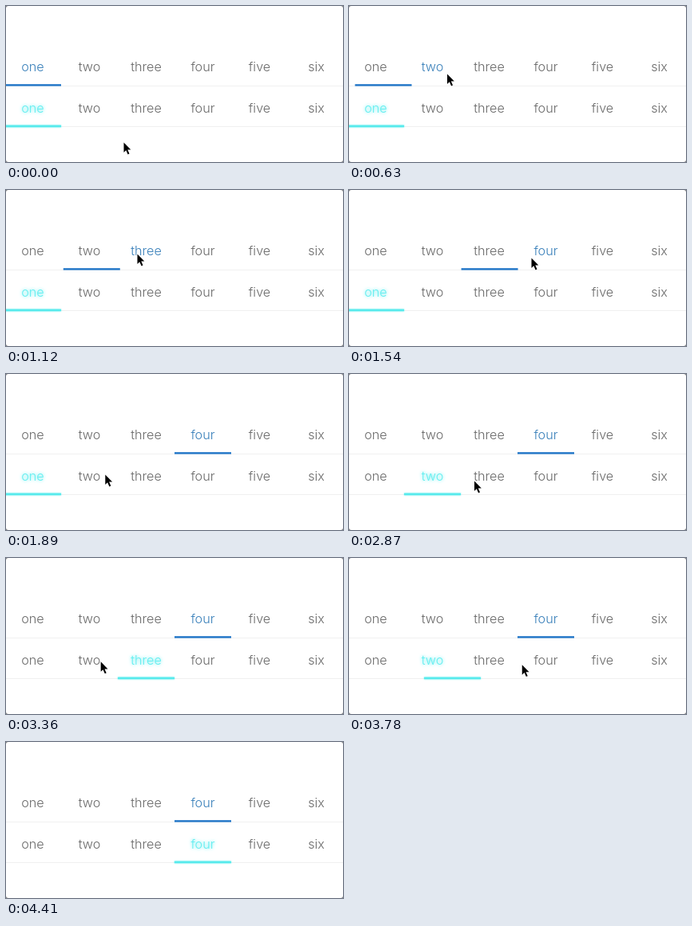
An HTML page with a canvas that plays this animation: 422x196 px, repeating every 4.55 s.

```html
<!DOCTYPE html>
<html lang="en">
<head>
<meta charset="utf-8">
<title>Tab bars</title>
<style>
  html, body { margin: 0; width: 100%; height: 100%; overflow: hidden; background: #fff; }
  canvas { display: block; }
</style>
</head>
<body>
<canvas id="stage" width="422" height="196"></canvas>
<script>
const ctx = document.getElementById('stage').getContext('2d');
const LOOP = 4550, TICK = 70, SLIDE = 300, LAG = 35, HOLD = 70;
const TAB = 71, LEFT = -2;
const labels = ['one', 'two', 'three', 'four', 'five', 'six'];
const rows = [
  { base: 82, line: 100, bar: 98.2, text: '#3a80ba', color: '#2076c8', glow: 0 },
  { base: 133.8, line: 151, bar: 149.8, text: '#62eef0', color: '#56eaec', glow: 4 }
];

// The pointer glides to (x, y) between go and stop, then releases a click on a tab
const home = { x: 147, y: 171 };
const moves = [
  { go: 70, stop: 490, x: 122.5, y: 85, row: 0, tab: 1, click: 558 },
  { go: 630, stop: 980, x: 164, y: 80, row: 0, tab: 2, click: 1068 },
  { go: 1120, stop: 1470, x: 228, y: 85, row: 0, tab: 3, click: 1500 },
  { go: 1580, stop: 2100, x: 103.5, y: 134, row: 1, tab: 1, click: 2519, hold: 2 * HOLD },
  { go: 2520, stop: 2940, x: 158, y: 134, row: 1, tab: 2, click: 3012 },
  { go: 3090, stop: 3550, x: 110, y: 129, row: 1, tab: 1, click: 3632 },
  { go: 3640, stop: 3900, x: 245, y: 135, row: 1, tab: 3, click: 4085 },
  { go: 4090, stop: 4390, x: 258, y: 200 }
];

const clamp = k => Math.min(1, Math.max(0, k));
const easeOut = k => 1 - (1 - clamp(k)) ** 2;

// CSS "ease": cubic-bezier(.25, .1, .25, 1), its parameter found by bisection
function ease(k) {
  const curve = (s, a, b) => 3 * a * s * (1 - s) ** 2 + 3 * b * s * s * (1 - s) + s ** 3;
  let s = .5;
  for (let step = .25; step > 1e-5; step /= 2) {
    s += curve(s, .25, .25) < clamp(k) ? step : -step;
  }
  return curve(s, .1, 1);
}

function drawRow({ base, line, bar, text, color, glow }, row, t) {
  let active = 0, pos = 0;
  for (const { tab, click } of moves.filter(m => m.row === row)) {
    if (t >= click) active = tab;
    pos += (tab - pos) * ease((t - click - LAG) / SLIDE);
  }
  ctx.fillStyle = '#f0f0f0';
  ctx.fillRect(0, line, 422, 1);

  ctx.shadowColor = color;
  labels.forEach((label, i) => {
    const on = i === active;
    ctx.fillStyle = on ? text : '#6a6a6a';
    ctx.shadowBlur = on ? glow : 0;
    ctx.fillText(label, LEFT + TAB * (i + .5), base);
  });
  ctx.shadowBlur = glow / 2;
  ctx.fillStyle = color;
  ctx.fillRect(LEFT + TAB * pos, bar, TAB, 2.4);
  ctx.shadowBlur = 0;
}

function drawPointer(t) {
  let { x, y } = home;
  for (const m of moves) {
    const k = easeOut((t - m.go) / (m.stop - m.go));
    x += (m.x - x) * k;
    y += (m.y - y) * k;
  }
  ctx.save();
  ctx.translate(x, y);
  if (moves.some(({ click, hold = HOLD }) => t >= click - hold && t < click)) {
    ctx.beginPath();
    ctx.arc(0, 0, 21.5, 0, 7);
    ctx.strokeStyle = '#111';
    ctx.lineWidth = 1.7;
    ctx.stroke();
  }
  const arrow = new Path2D('M.5 .5V13L3.3 10.3 5.6 15.4 7.5 14.6 5.3 9.6H9.3Z');
  ctx.lineJoin = 'round';
  ctx.strokeStyle = '#fff';
  ctx.lineWidth = 1.8;
  ctx.stroke(arrow);
  ctx.fillStyle = '#000';
  ctx.fill(arrow);
  ctx.restore();
}

function draw(t) {
  ctx.fillStyle = '#777';
  ctx.fillRect(0, 0, 422, 196);
  ctx.fillStyle = '#fff';
  ctx.beginPath();
  ctx.roundRect(0, 0, 422, 196, 3);
  ctx.fill();
  ctx.font = '300 16.2px Inter, Roboto, sans-serif';
  ctx.textAlign = 'center';
  rows.forEach((row, i) => drawRow(row, i, t));
  drawPointer(t);
}

let start;
function frame(now) {
  start ??= now;
  draw(Math.floor((now - start) % LOOP / TICK) * TICK);
  requestAnimationFrame(frame);
}
requestAnimationFrame(frame);
</script>
</body>
</html>
```
